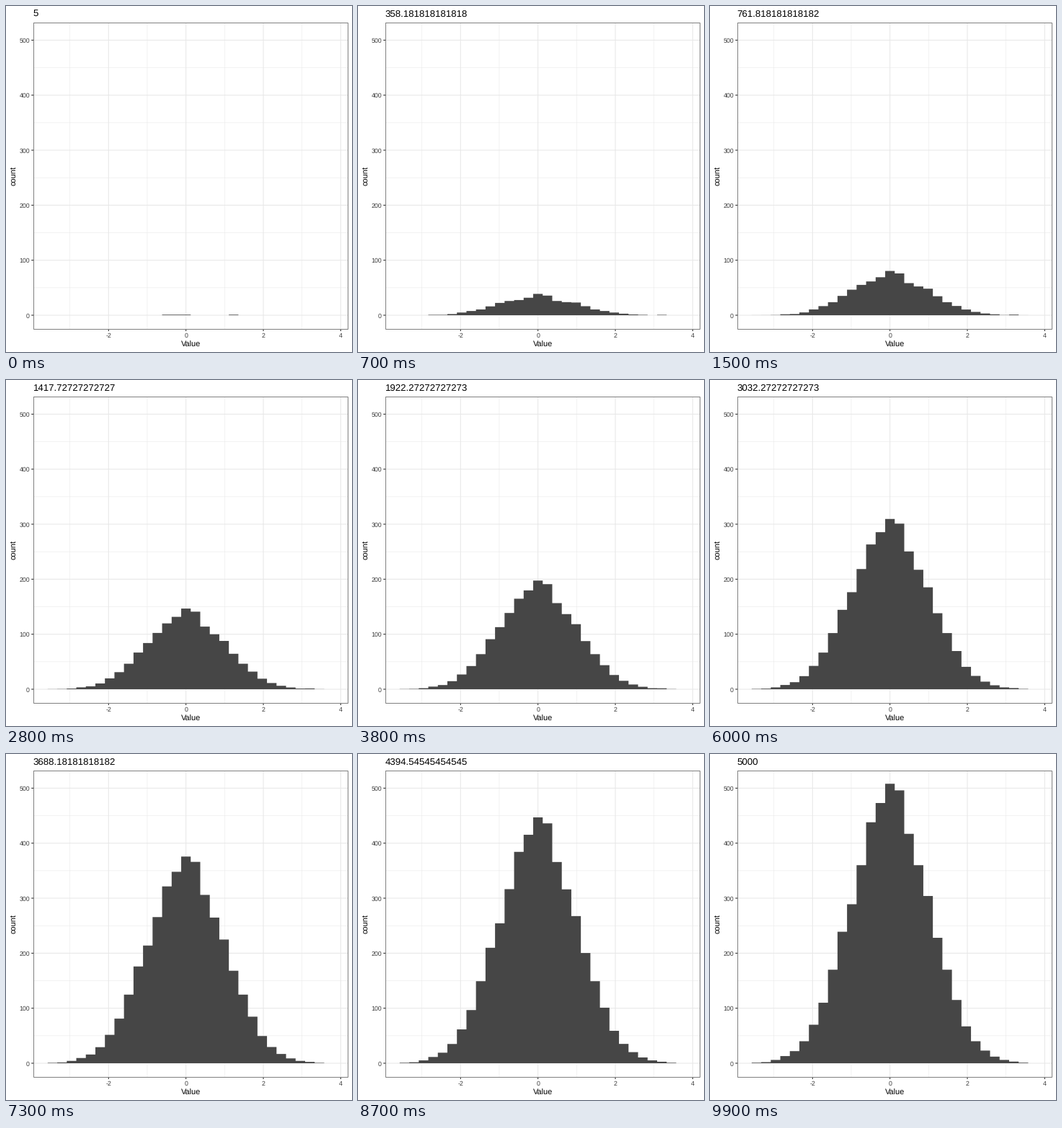
A matplotlib script for the animation above (10 s loop, 480 by 480 pixels).

```python
import matplotlib.pyplot as plt
import numpy as np
from matplotlib.animation import FuncAnimation

plt.rcParams["font.family"] = "Liberation Sans"
plt.rcParams["text.hinting"] = "none"

SIZE, DPI = 480, 80
PX = 72 / DPI  # points per pixel
FRAMES = 100
LEFT, RIGHT, TOP, BOTTOM = 38, 474.5, 23.5, 448.3
BINS, MID = 30, 14
BIN_WIDTH = 0.2464
PEAK = 506

# The data fills the panel less a 5% expansion on each side
pad_x, pad_y = (RIGHT - LEFT) / 22, (BOTTOM - TOP) / 22
edges = np.linspace(LEFT + pad_x, RIGHT - pad_x, BINS + 1)
unit_x = (edges[1] - edges[0]) / BIN_WIDTH
zero_x = (edges[MID] + edges[MID + 1]) / 2
zero_y = BOTTOM - pad_y
unit_y = (zero_y - TOP - pad_y) / PEAK


def px(value):
    return zero_x + value * unit_x


def py(count):
    return zero_y - count * unit_y


def tally(values):
    return np.histogram(px(np.array(values)), edges)[0]


# Normal curve with slight ripples that stand in for sampling noise
k = np.arange(BINS) - MID
bell = np.exp(-(k * BIN_WIDTH) ** 2 / 2)
density = BIN_WIDTH / np.sqrt(2 * np.pi) * bell

first = tally([-0.5, -0.25, 0, 1.25])
ripple = 0.035 * np.cos(np.pi * k / 3) + 0.028 * np.sin(2 * np.pi * k / 3)
last = np.floor(5000 * density * (1 + ripple))
ripple = 0.11 * np.cos(np.pi * k / 2 - 0.3)
middle = np.floor(last / 10 + 500 * density * ripple) + tally([3.2, 3.7])


def counts_at(i, turn=10):
    if i < turn:
        return first + (middle - first) * i / turn
    return middle + (last - middle) * (i - turn) / (FRAMES - 1 - turn)


fig = plt.figure(figsize=(SIZE / DPI, SIZE / DPI), dpi=DPI, facecolor="white")
ax = fig.add_axes([0, 0, 1, 1])
ax.set(xlim=(0, SIZE), ylim=(SIZE, 0))
ax.axis("off")


def line(xs, ys, color, width, z):
    ax.plot(xs, ys, color=color, lw=width * PX, zorder=z, snap=False,
            solid_capstyle="butt", solid_joinstyle="miter")


def label(x, y, text, size, color="black", ha="center", rotation=0):
    return ax.text(x, y, text, size=size * PX, color=color, ha=ha,
                   va="baseline", rotation=rotation, rotation_mode="anchor")


def grid_x(value, width):
    line([px(value)] * 2, [TOP, BOTTOM], "#e8e8e8", width, 1)


def grid_y(count, width):
    line([LEFT, RIGHT], [py(count)] * 2, "#e8e8e8", width, 1)


for v in range(-3, 4, 2):
    grid_x(v, 0.53)
for c in range(50, 500, 100):
    grid_y(c, 0.53)

for v in range(-2, 5, 2):
    grid_x(v, 1.07)
    line([px(v)] * 2, [BOTTOM, BOTTOM + 2.75], "#262626", 1.07, 3)
    label(px(v), 460.2, str(v), 8.8, "#3c3c3c")
for c in range(0, 501, 100):
    grid_y(c, 1.07)
    line([LEFT - 2.75, LEFT], [py(c)] * 2, "#262626", 1.07, 3)
    label(33, py(c) + 3.6, str(c), 8.8, "#3c3c3c", ha="right")

# Panel border, centred on whole pixels
x0, x1, y0, y1 = (np.floor(v) + 0.5 for v in (LEFT, RIGHT, TOP, BOTTOM))
line([x0, x1, x1, x0, x0], [y0, y0, y1, y1, y0], "#808080", 1, 4)

label((LEFT + RIGHT) / 2, 473.2, "Value", 11)
label(13, (TOP + BOTTOM) / 2, "count", 11, rotation=90)
title = label(37.6, 15.2, "", 13.2, ha="left")

bars = ax.stairs(py(first), edges, baseline=zero_y, fill=True,
                 color="#464646", lw=0, zorder=2)
bars.set_snap(False)


def update(i):
    title.set_text(f"{5 + 4995 * i / (FRAMES - 1):.15g}")
    bars.set_data(values=py(counts_at(i)))
    return bars, title


anim = FuncAnimation(fig, update, frames=FRAMES, interval=100,
                     repeat=True, repeat_delay=0)
plt.show()
```
